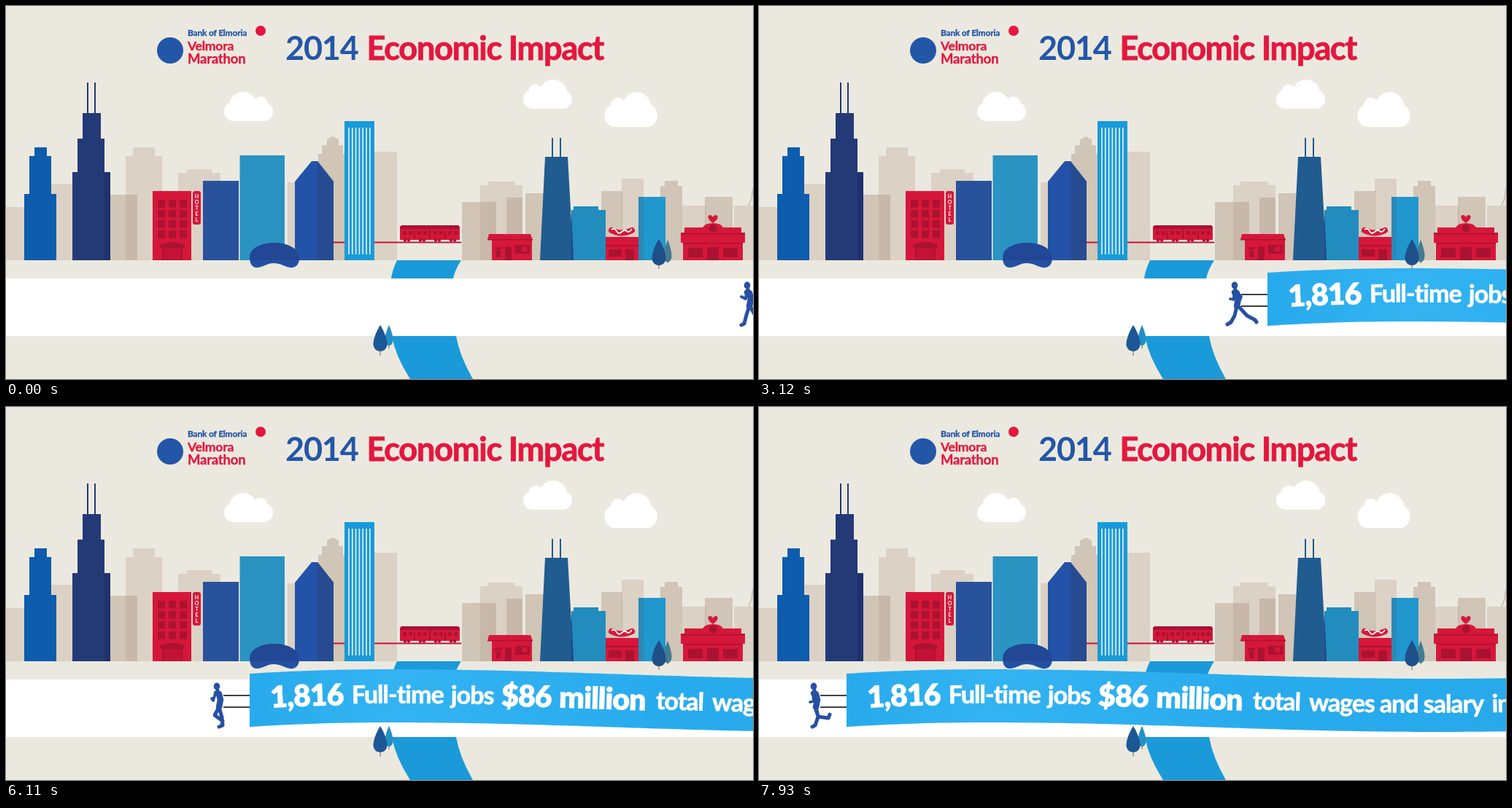
Write an HTML page that moves like this. It is 1024 px wide and 512 px high and loops after 8000 ms.

```html
<!DOCTYPE html>
<html lang="en">
<head>
<meta charset="utf-8">
<title>Economic Impact</title>
<style>
  html, body { margin: 0; width: 100%; height: 100%; overflow: hidden; background: #ebe9df; }
  svg { display: block; width: 100vw; height: 100vh; }
  text { font-family: Lato, "Open Sans", sans-serif; font-weight: 700; letter-spacing: -1px; }
  .title { font-size: 45px; letter-spacing: -1.2px; }
  .title.red { stroke-width: .9px; }
  .title.blue { stroke: none; }
  .brand { letter-spacing: -.2px; stroke-width: .35px; }
  .blue { fill: #2456a8; stroke: #2456a8; }
  .red { fill: #e4173e; stroke: #e4173e; }
  .sign { font-size: 7px; fill: #fff; text-anchor: middle; letter-spacing: 0; }
  .light { fill: #dbd1c5; }
  .mid { fill: #b09a85; fill-opacity: .45; }
  .brick { fill: #d6173a; }
  .dark { fill: #ab1232; }
  .sky { fill: #1a9ad8; }
  #banner text { fill: #fff; stroke: #fff; stroke-width: .7px; font-size: 34px; }
  #banner .big { font-size: 41px; font-weight: 900; }
  #runner path { fill: none; stroke: #2750a3; stroke-linecap: round; stroke-linejoin: round; }
</style>
</head>
<body>
<svg viewBox="0 0 1024 512" preserveAspectRatio="none">
  <defs>
    <g id="cloud" fill="#fff">
      <rect x="299" y="132" width="67" height="26" rx="13"/>
      <circle cx="325" cy="137" r="19"/><circle cx="349" cy="134" r="9.500"/>
    </g>
    <path id="leaf" d="M0 0C4 6 9.500 18 9.500 26C9.500 32 5 36 0 36S-9.500 32-9.500 26C-9.500 18-4 6 0 0Z"/>
    <linearGradient id="cloth" gradientUnits="userSpaceOnUse" x1="0" x2="960" y1="0" y2="0">
      <stop offset="0" stop-color="#27aaec"/><stop offset=".2" stop-color="#33b3f2"/>
      <stop offset=".6" stop-color="#28abed"/><stop offset="1" stop-color="#27a9ea"/>
    </linearGradient>
    <path id="line"/><path id="bigLine"/>
  </defs>
  <rect width="1024" height="512" fill="#ebe9df"/>

  <!-- heading -->
  <circle cx="225" cy="61" r="18" fill="#2456a8"/>
  <circle cx="349" cy="34" r="7" fill="#e4173e"/>
  <text class="brand blue" x="249" y="41" font-size="12">Bank of Elmoria</text>
  <text class="brand red" x="249" y="61" font-size="17.500">Velmora</text>
  <text class="brand red" x="249" y="79" font-size="18.500">Marathon</text>
  <text class="title blue" x="383" y="74">2014</text>
  <text class="title red" x="494.500" y="74">Economic Impact</text>

  <use href="#cloud"/>
  <use href="#cloud" transform="translate(1075 -17) scale(-1 1)"/>
  <use href="#cloud" transform="translate(1214 -23.600) scale(-1.075 1.200)"/>

  <!-- distant buildings -->
  <g class="light">
    <path d="M0 276H27V349H0ZM62 244H95V349H62ZM164 349V206H174V194H204V206H214V349Z"/>
    <path d="M236 349V229H248V224H282V229H294V349ZM386 242H400V349H386ZM505 200H536V349H505Z"/>
    <path d="M650 349V246H660V241H698V246H708V349ZM844 237H874V349H844ZM927 274H960V349H927ZM998 274H1024V349H998Z"/>
  </g>
  <g class="mid">
    <path d="M143 259H180V349H143ZM428 349V203H433V191H440V183L448 179L456 183V191H462V203H468V349Z"/>
    <path d="M625 269H672V349H625ZM686 263H708V349H686ZM712 257H742V349H712ZM816 254H845V349H816Z"/>
    <path d="M897 349V247H903V240H921V247H927V349ZM958 262H996V349H958Z"/>
  </g>
  <path d="M1024 250L1022 264L1018 274" fill="none" stroke="#cfc3b5" stroke-width="2"/>

  <!-- rail -->
  <path d="M449 324.500H624" stroke="#c4143a" stroke-width="2"/>
  <path class="brick" d="M540 321V305Q540 301 544 301H618Q622 301 622 305V321Z"/>
  <path class="dark" d="M540 306V305Q540 301 544 301H618Q622 301 622 305V306ZM580 306h2v15h-2Z"/>
  <g id="train" class="dark"></g>

  <!-- towers -->
  <path fill="#0e5cad" d="M25 349V258H32V206H39V194H56V206H62V258H69V349Z"/>
  <path fill="#243a77" d="M91 349V228H98V182H105V147H111V105H113V147H121V105H123V147H130V182H135V228H143V349Z"/>
  <path fill="#1f326e" d="M135 228H143V349H135Z"/>
  <path fill="#28529c" d="M270 240H319V349H270Z"/>
  <path fill="#2a93c2" d="M320.500 205H382V349H320.500Z"/>
  <path fill="#2353a8" d="M396 349V241L419 213H427L449 241V349Z"/>
  <path fill="#264b91" d="M427 213L449 241V349H427Z"/>
  <path class="sky" d="M464 158H505V349H464Z"/>
  <path id="stripes" stroke="#e9f3f5" stroke-width="1.600"/>
  <path fill="#238cbf" d="M775 349V280H778V275H812V280H822V349Z"/>
  <path fill="#205c90" d="M732 349L739 207H748V181H750V207H759V181H761V207H770L778 349Z"/>
  <path fill="#1e4b87" d="M775 280L778 349H775Z"/>
  <path fill="#2097cd" d="M867 262H904V349H867Z"/>
  <path fill="#2a89b6" d="M867 262H874V349H867Z"/>

  <!-- hotel -->
  <path class="brick" d="M201 254H254V349H201Z"/>
  <g id="windows" class="dark"></g>
  <path class="dark" d="M211 332V328Q228 320 245 328V332H242V349H240V332H216V349H214V332Z"/>
  <path fill="#c31235" d="M216 332H240V349H216Z"/>
  <rect class="brick" x="256" y="254" width="11" height="46" rx="3"/>
  <g id="hotel"></g>

  <!-- shops -->
  <path class="brick" d="M662 313H719L722 321H721V349H666V321H660Z"/>
  <path class="dark" d="M660 320H722V321.500H660ZM684 330H693V349H684ZM670 331H680V334H670ZM672 335H678V345H672ZM698 328H718V340H698Z"/>
  <circle class="brick" cx="711" cy="333.500" r="4"/>
  <path class="brick" d="M822 317H867V349H822Z"/>
  <path class="dark" d="M822 328H867V330H822ZM826 334H844V344H826ZM849 334H861V349H849Z"/>
  <path d="M830 308Q844 315 858 308" fill="none" stroke="#d6173a" stroke-width="8" stroke-linecap="round"/>
  <path d="M830 307Q834 304 837 309T844 310T851 309T858 306" fill="none" stroke="#fff" stroke-width="1.800"/>
  <path class="brick" d="M925 325V311H930V304H955Q958 298 969 298T983 304H1008V311H1013V325H1010V349H928V325Z"/>
  <path class="dark" d="M925 312H1013V313.500H925ZM928 325H1010V326.500H928ZM935 332H955V345H935ZM983 332H1003V345H983ZM961 331H977V349H961Z"/>
  <path class="brick" d="M969 298C961 293 961 287 965 287Q968 287 969 290Q970 287 973 287C977 287 977 293 969 298Z"/>
  <circle class="dark" cx="969" cy="305" r="5.500"/>

  <path fill="#2450a3" d="M334 345C334 332 350 325 368 325S402 333 402 346C402 356 396 360 389 359C380 357 376 353 367 353S353 358 345 359C338 360 334 354 334 345Z"/>
  <path fill="#213f85" opacity=".5" d="M335 342C337 331 352 325 368 325S399 332 401 343V349H335Z"/>

  <!-- river and road -->
  <path class="sky" d="M536 349H624Q616 361 613 374H528Q530 361 536 349Z"/>
  <path fill="#fff" d="M0 374H1024V453H0Z"/>
  <path class="sky" d="M529 453H617Q622 481 640 512H554Q534 481 529 453Z"/>

  <g stroke="#a3907c" stroke-width="1.500">
    <path d="M907 345V353M895 350V361M525 464V470M513 468V480"/>
  </g>
  <use href="#leaf" transform="translate(907 321) scale(.58 .85)" fill="#447b92"/>
  <use href="#leaf" transform="translate(895 320)" fill="#1e4f88"/>
  <use href="#leaf" transform="translate(525 438) scale(.58 .78)" fill="#238fc5"/>
  <use href="#leaf" transform="translate(513 438)" fill="#1c5796"/>

  <g id="mover">
    <g id="runner">
      <path d="M-36 396H0M-36 412H0" style="stroke:#3c4048;stroke-width:1.800;stroke-linecap:butt"/>
      <ellipse cx="-45" cy="383.500" rx="4.300" ry="5" fill="#2750a3"/>
      <path d="M-45 393L-42 394L-40 402L-42 412" stroke-width="8.500"/>
      <path d="M-45 385L-43 392" stroke-width="4.500"/>
      <path id="legs" stroke-width="5"/>
      <path id="arms" stroke-width="3.800"/>
    </g>
    <g id="banner"><path id="sheet" fill="url(#cloth)"/></g>
  </g>
</svg>
<script>
const $ = id => document.getElementById(id);
const NS = "http://www.w3.org/2000/svg";

function add(parent, tag, attrs, text) {
  const el = document.createElementNS(NS, tag);
  for (const key in attrs) el.setAttribute(key, attrs[key]);
  if (text) el.textContent = text;
  parent.append(el);
  return el;
}

function box(parent, x, y, width, height) {
  add(parent, "rect", { x, y, width, height });
}

// Repeated building details
for (let row = 0; row < 4; row++)
  for (let col = 0; col < 3; col++) box($("windows"), 208 + col * 15, 266 + row * 14, 10, 10.5);

for (let car = 0; car < 2; car++) {
  const x = 540 + car * 42;
  for (const dx of [4, 12, 24, 32]) box($("train"), x + dx, 309, 5, 5);
  box($("train"), x + 19, 309, 2, 12);
  for (const dx of [7, 12, 28, 33])
    add($("train"), "circle", { cx: x + dx, cy: 321.5, r: 2.2 });
}

[..."HOTEL"].forEach((c, i) =>
  add($("hotel"), "text", { class: "sign", x: 261.5, y: 264 + i * 8 }, c));

$("stripes").setAttribute("d",
  Array.from({ length: 7 }, (_, i) => `M${470 + i * 4.8} 167V341`).join(""));

// Upper edge of the banner at distance x from its leading end
function wave(x) {
  return x < 190
    ? 360 + 6 * (1 - x / 190) ** 2
    : 366.5 - 6.5 * Math.cos(Math.PI * (x - 190) / 620);
}

function edge(offset) {
  const pts = [];
  for (let x = 0; x <= 1040; x += 10) pts.push(`${x} ${(wave(x) + offset).toFixed(2)}`);
  return pts;
}

$("sheet").setAttribute("d", `M${edge(0).join("L")}L${edge(73).reverse().join("L")}Z`);
$("line").setAttribute("d", "M" + edge(46.5).join("L"));
$("bigLine").setAttribute("d", "M" + edge(48.5).join("L"));

const words = [
  [29, "1,816", 1], [140, "Full-time"], [276, "jobs"], [345, "$86", 1], [424, "million", 1],
  [557, "total"], [634, "wages"], [731, "and"], [791, "salary"], [885, "in"]
];
for (const [startOffset, word, big] of words) {
  const text = add($("banner"), "text", big ? { class: "big" } : {});
  add(text, "textPath", { href: big ? "#bigLine" : "#line", startOffset }, word);
}

// Running cycle: legs, arms
const poses = [
  ["M-42 412L-46 424L-49 436L-53 438M-41 412L-34 425L-21 429L-19 426", "M-46 393L-47 402L-53 399M-41 394L-37 402L-40 406"],
  ["M-43 412L-39 425L-43 437L-47 439M-42 412L-39 425L-25 427L-23 422", "M-46 393L-45 404L-50 405"],
  ["M-42 412L-38 426L-37 437L-42 439M-42 412L-48 423L-37 431L-38 436", "M-47 393L-50 403L-52 400"],
  ["M-42 412L-48 422L-47 431L-51 432M-41 412L-30 425L-20 434L-18 437", "M-46 393L-52 396L-51 405M-41 394L-37 402L-41 407"],
  ["M-42 412L-45 425L-50 434L-55 437M-40 412L-28 425L-17 431L-15 434", "M-46 393L-46 403L-51 402M-41 394L-36 399L-39 406"]
];

// Step number and position of the banner's leading end
const track = [
  [0, 1061], [7, 956], [16, 823], [24, 697], [33, 553],
  [41, 430], [49, 302], [53, 241], [56, 200], [61, 120]
];

function place(step) {
  const i = Math.max(1, track.findIndex(([s]) => s >= step));
  const [s0, x0] = track[i - 1], [s1, x1] = track[i];
  return x0 + (x1 - x0) * (step - s0) / (s1 - s0);
}

const LOOP = 8000, STEP = 130;
let last = -1;

function draw() {
  const step = Math.floor(performance.now() % LOOP / STEP);
  if (step !== last) {
    last = step;
    const [legs, arms] = poses[step % poses.length];
    $("mover").setAttribute("transform", `translate(${Math.round(place(step))} 0)`);
    $("legs").setAttribute("d", legs);
    $("arms").setAttribute("d", arms);
  }
  requestAnimationFrame(draw);
}
draw();
</script>
</body>
</html>
```
